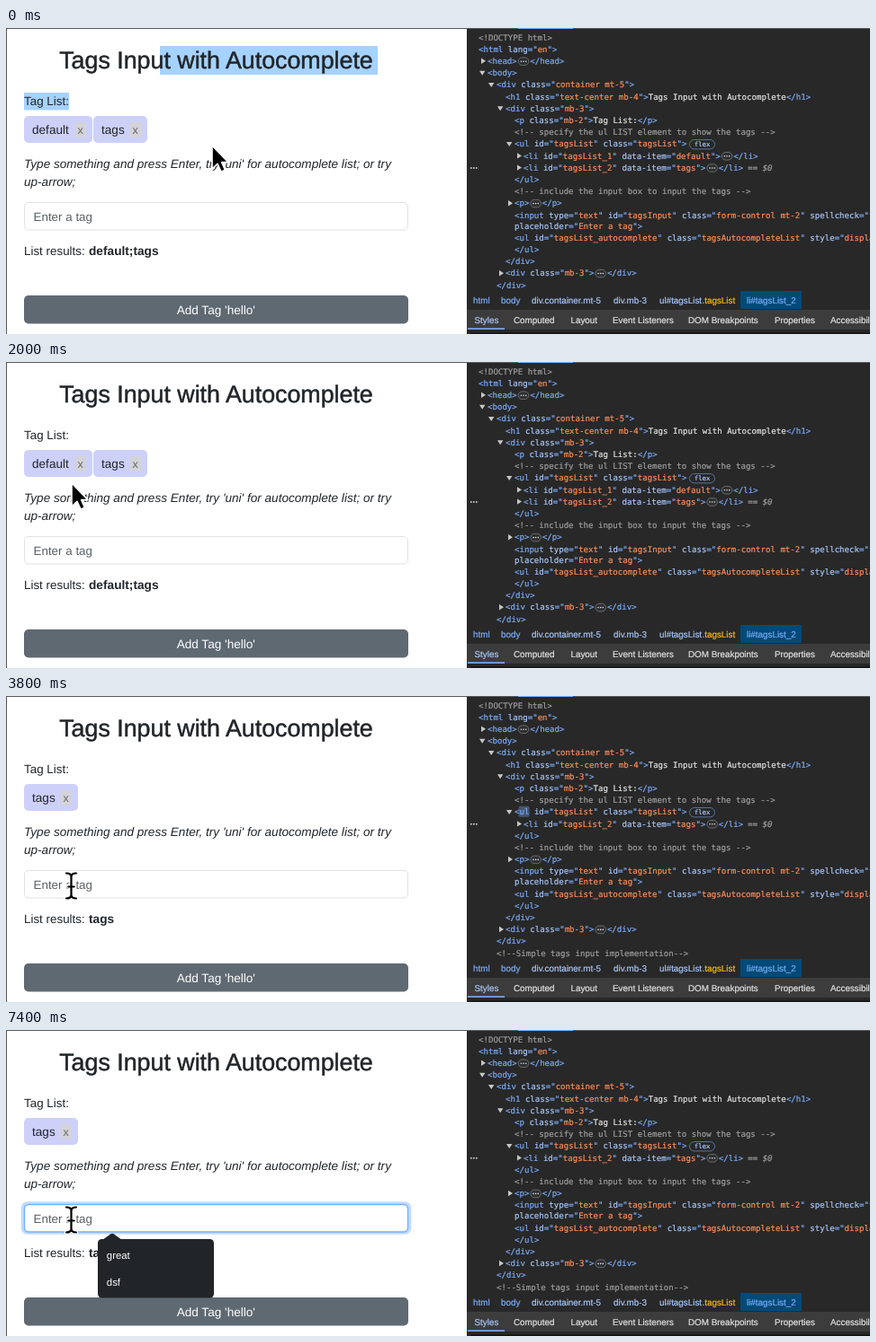
Write an HTML page that moves like this. It is 960 px wide and 341 px high and loops after 8 s.

```html
<!DOCTYPE html>
<html lang="en">
<head>
<meta charset="utf-8">
<title>Tags input demo</title>
<style>
html, body { margin: 0; width: 100%; height: 100%; overflow: hidden; background: #fff; }
svg { display: block; text-rendering: geometricPrecision; }
text { white-space: pre; }
.page text { font: 13.4px "Liberation Sans", Arial, sans-serif; fill: #212529; }
.tools text { font: 9.85px "Liberation Sans", Arial, sans-serif; fill: #e3e3e3; stroke-width: .2px; }
.tools .mono text { font: 9.09px "DejaVu Sans Mono", monospace; }
.pill { fill: #cdd0f9; }
.close { fill: #d3d3da; }
</style>
</head>
<body>
<svg id="stage" width="960" height="341" viewBox="0 0 960 341">
  <g class="page">
    <rect width="512" height="341" fill="#fff"/>
    <g id="selection" fill="#a6d2ff">
      <rect x="171" y="20" width="242" height="32"/>
      <rect x="20" y="72" width="50" height="19.5"/>
    </g>
    <text x="233.5" y="45" text-anchor="middle" style="font-size:26.8px" stroke="#212529" stroke-width=".5">Tags Input with Autocomplete</text>
    <text x="20" y="86.3">Tag List:</text>
    <g id="tagsBefore"></g>
    <g id="tagsAfter"></g>
    <text x="20" y="156" style="font-size:13.58px;font-style:italic">Type something and press Enter, try 'uni' for autocomplete list; or try</text>
    <text x="20" y="176" style="font-size:13.58px;font-style:italic">up-arrow;</text>
    <rect id="glow" x="16.7" y="191.2" width="433.6" height="36.6" rx="7" fill="#c2dbfe"/>
    <rect id="field" x="20.5" y="194.5" width="426" height="30.5" rx="4.5" fill="#fff"/>
    <text x="30.5" y="214.5" style="fill:#5c6064">Enter a tag</text>
    <rect id="caret" x="30.4" y="202" width="1.1" height="15" fill="#333"/>
    <text x="20" y="253.3">List results:</text>
    <text id="result" x="92" y="253.3" style="font-size:13.7px;font-weight:bold"></text>
    <rect x="20" y="298" width="427" height="31.5" rx="5" fill="#5f6972"/>
    <text x="233.3" y="318.7" text-anchor="middle" style="fill:#fff;font-size:13.6px">Add Tag 'hello'</text>
    <g id="popup">
      <path d="M107 234 L116 227.4 Q118 226 120 227.4 L129 234 Z" fill="#222527"/>
      <rect x="102" y="233" width="129" height="65.5" rx="4.5" fill="#222527"/>
      <text x="111.8" y="255.4" style="fill:#fff;font-size:11.4px">great</text>
      <text x="111.8" y="285.2" style="fill:#fff;font-size:11.4px">dsf</text>
    </g>
    <path d="M0 .5H512M.5 0V341" stroke="#5a5a5a" fill="none"/>
  </g>
  <g class="tools">
    <rect x="512" width="448" height="341" fill="#282828"/>
    <rect x="512" width="448" height="1" fill="#5a5a5a"/>
    <rect x="569" width="61" height="1" fill="#7cacf8"/>
    <rect id="flash" x="569.5" y="122.8" width="12" height="12" rx="1.5" fill="#7cacf8"/>
    <g id="domBefore" class="mono"></g>
    <g id="domAfter" class="mono"></g>
    <rect x="512" y="293" width="448" height="21" fill="#282828"/>
    <rect x="816" y="293" width="68" height="20" fill="#004a77"/>
    <g id="crumbs"></g>
    <rect x="512" y="314" width="448" height="22" fill="#3c3c3c"/>
    <rect x="513" y="334.4" width="41" height="1.6" fill="#7cacf8"/>
    <g id="tabs"></g>
    <rect x="516" y="339.5" width="444" height="1.5" fill="#111"/>
  </g>
  <g id="arrow">
    <path d="M0 0V26L6 20.3L10 29.2L14.4 27.3L10.7 18.6H18Z" fill="#000" stroke="#fff" stroke-width="1.6" stroke-linejoin="round"/>
  </g>
  <g id="hand">
    <path d="M-3 14V2.8Q-3 0 -.2 0Q2.6 0 2.6 3V10.5Q3.2 8.4 6 8.6Q8.4 9 8.8 11.2Q10 9.4 12.6 10Q15 10.7 15 13Q17 11.6 19 12.5Q21 13.5 21 16V20Q21 24 18.5 26.5V30H4.2V27Q0 23.4 -2 20L-6 15.4Q-7.4 12.8 -5.6 11.7Q-4 11.2 -3 14Z" fill="#fff" stroke="#000" stroke-width="1.7" stroke-linejoin="round"/>
    <path d="M6.5 15V22M10.5 15V22M14.5 15V22" stroke="#000" stroke-width="1.5"/>
  </g>
  <g id="beam" fill="none" stroke-linecap="round"></g>
</svg>
<script>
const NS = "http://www.w3.org/2000/svg";
const $ = id => document.getElementById(id);
const LOOP = 8000;
const CHAR = 5.472, ROW = 13.2, WRAP = 12;
const BLUE = "#7cacf8", PALE = "#a8c7fa", ORANGE = "#fe8d59", GRAY = "#9e9e9e", LIGHT = "#e3e3e3";

function add(parent, name, attrs, content) {
  const el = document.createElementNS(NS, name);
  for (const k in attrs) el.setAttribute(k, attrs[k]);
  if (content) el.textContent = content;
  parent.appendChild(el);
  return el;
}
const label = (parent, x, y, str, style = "") => add(parent, "text", { x, y, style }, str);
const ink = color => `fill:${color};stroke:${color};`;

// Text cursor: dark strokes over a white halo
for (const [stroke, width] of [["#fff", 4.4], ["#000", 2.2]])
  add($("beam"), "path", {
    d: "M-5.5 -14Q0 -14 0 -10Q0 -14 5.5 -14M0 -10V10M-5.5 14Q0 14 0 10Q0 14 5.5 14M-3.2 1H3.2",
    stroke, "stroke-width": width
  });

function tag(parent, x, width, name) {
  add(parent, "rect", { x, y: 98, width, height: 30, rx: 5, class: "pill" });
  label(parent, x + 9, 118, name, "font-size:13.6px");
  add(parent, "rect", { x: x + width - 19.5, y: 105, width: 12.5, height: 17, rx: 1, class: "close" });
  label(parent, x + width - 16.4, 117.6, "x", "fill:#666;font-size:12.6px");
}
tag($("tagsBefore"), 20, 76, "default");
tag($("tagsBefore"), 97, 60, "tags");
tag($("tagsAfter"), 20, 60, "tags");

const TOKEN = /(<!.*)|(<\/?\w+|>)|([\w-]+)="([^"]*)("?)|(…)|(\s+|[^<…]+)/g;

// Draws one highlighted line and returns the x where it ends
function codeLine(g, x, mid, src, fold) {
  if (fold) add(g, "path", {
    d: fold === "v" ? `M${x - 9} ${mid - 2.4}h6.4l-3.2 5z` : `M${x - 7} ${mid - 3.3}v6.4l5 -3.2z`,
    fill: "#c7c7c7"
  });
  const put = (str, color) => {
    if (str.trim()) label(g, x, mid + 3.1, str, ink(color));
    x += str.length * CHAR;
  };
  for (const [, note, mark, name, value, quote, dots, text] of src.matchAll(TOKEN)) {
    if (note) put(note, GRAY);
    else if (mark) put(mark, BLUE);
    else if (name) {
      put(name, PALE);
      put('="', BLUE);
      put(value, ORANGE);
      put(quote, BLUE);
    } else if (dots) {
      add(g, "rect", { x: x + 1.4, y: mid - 4, width: 11.6, height: 8.6, rx: 4.3, fill: "#2e2f31", stroke: "#85878a", "stroke-width": .7 });
      for (const dx of [4.6, 7.2, 9.8])
        add(g, "circle", { cx: x + dx, cy: mid + .3, r: .8, fill: LIGHT });
      x += 14.4;
    } else put(text, LIGHT);
  }
  return x;
}

const item = (n, name) => [575, `<li id="tagsList_${n}" data-item="${name}">…</li>`, "h"];
const head = [
  [525, "<!DOCTYPE html>"],
  [525, '<html lang="en">'],
  [535, "<head>…</head>", "h"],
  [535, "<body>", "v"],
  [545, '<div class="container mt-5">', "v"],
  [555, '<h1 class="text-center mb-4">Tags Input with Autocomplete</h1>'],
  [555, '<div class="mb-3">', "v"],
  [565, '<p class="mb-2">Tag List:</p>'],
  [565, "<!-- specify the ul LIST element to show the tags -->"],
  [565, '<ul id="tagsList" class="tagsList">', "v"]
];
const tail = [
  [565, "</ul>"],
  [565, "<!-- include the input box to input the tags -->"],
  [565, "<p>…</p>", "h"],
  [565, '<input type="text" id="tagsInput" class="form-control mt-2" spellcheck="false"'],
  [565, 'placeholder="Enter a tag">'],
  [565, '<ul id="tagsList_autocomplete" class="tagsAutocompleteList" style="display'],
  [565, "</ul>"],
  [555, "</div>"],
  [555, '<div class="mb-3">…</div>', "h"],
  [545, "</div>"],
  [545, "<!--Simple tags input implementation-->"]
];

function dom(g, items) {
  let mid = 10.5 - ROW;
  [...head, ...items, ...tail].slice(0, 22).forEach(([x, src, fold], row) => {
    mid += src.startsWith("placeholder") ? WRAP : ROW;
    const end = codeLine(g, x, mid, src, fold);
    if (row === 9) {
      add(g, "rect", { x: 759.5, y: mid - 4.8, width: 28, height: 10.4, rx: 5.2, fill: "none", stroke: "#5c7ba8", "stroke-width": .9 });
      label(g, 764.8, mid + 2.9, "flex", ink(PALE) + "font-size:7.3px");
    }
    if (row === 9 + items.length) {
      label(g, end + 5, mid + 3.1, "==", ink(GRAY));
      label(g, end + 5 + 3 * CHAR, mid + 3.1, "$0", ink(GRAY) + "font-style:italic");
      for (const cx of [516.8, 519.8, 522.8])
        add(g, "circle", { cx, cy: mid + .3, r: 1, fill: "#c7c7c7" });
    }
  });
}
dom($("domBefore"), [item(1, "default"), item(2, "tags")]);
dom($("domAfter"), [item(2, "tags")]);

for (const [x, str, color] of [
  [519, "html", BLUE], [550, "body", BLUE], [584, "div.container.mt-5", PALE], [675, "div.mb-3", PALE],
  [726, "ul#tagsList", PALE], [773.5, ".tagsList", "#fbbc04"], [823, "li#tagsList_2", BLUE]
]) label($("crumbs"), x, 307.3, str, ink(color));

for (const [x, str, color = LIGHT] of [
  [520.5, "Styles", PALE], [564, "Computed"], [627.5, "Layout"], [674, "Event Listeners"],
  [758, "DOM Breakpoints"], [854, "Properties"], [916, "Accessibility"]
]) label($("tabs"), x, 328.6, str, ink(color));

// Timelines: [start ms, ...values], each held until the next entry
const cursor = [
  [0, "arrow", 229, 131], [800, "arrow", 217, 146], [1000, "arrow", 186, 180],
  [1200, "beam", 138, 215], [1400, "arrow", 86, 171], [1600, "beam", 68, 153],
  [1800, "arrow", 70, 146], [2000, "arrow", 73, 135], [2200, "arrow", 76, 128],
  [2400, "hand", 80, 119], [2600, "hand", 81, 117], [3200, "hand", 81, 118],
  [3400, "arrow", 76, 140], [3600, "arrow", 72, 178], [3800, "beam", 72.5, 211.5]
];
const flash = [[0, 0], [3200, .6], [3400, .55], [3600, .45], [3800, .35], [4000, .2], [4200, .1], [4400, 0]];
const focus = [[0, 0], [4000, .5], [4200, 1]];
const caret = [[0, 0], [4000, 1], [4400, 0], [5000, 1], [5400, 0], [6000, 1], [6400, 0], [7000, 1], [7400, 0]];

const at = (track, t) => track.findLast(step => step[0] <= t).slice(1);
const show = (id, on) => $(id).style.display = on ? "" : "none";

function draw(t) {
  const [kind, x, y] = at(cursor, t);
  for (const id of ["arrow", "hand", "beam"]) show(id, id === kind);
  $(kind).setAttribute("transform", `translate(${x} ${y})`);

  const removed = t >= 3200;
  show("selection", t < 200);
  show("tagsBefore", !removed);
  show("tagsAfter", removed);
  show("domBefore", !removed);
  show("domAfter", removed);
  $("result").textContent = removed ? "tags" : "default;tags";
  $("flash").setAttribute("opacity", at(flash, t)[0]);

  const [focused] = at(focus, t);
  $("glow").setAttribute("opacity", focused);
  $("field").setAttribute("stroke", focused ? "#74b0fb" : "#dee2e6");
  $("field").setAttribute("stroke-width", focused ? 1.4 : 1);
  show("caret", at(caret, t)[0]);
  show("popup", t >= 4200);
}

const start = performance.now();
function tick() {
  draw((performance.now() - start) % LOOP);
  requestAnimationFrame(tick);
}
draw(0);
requestAnimationFrame(tick);
</script>
</body>
</html>
```
